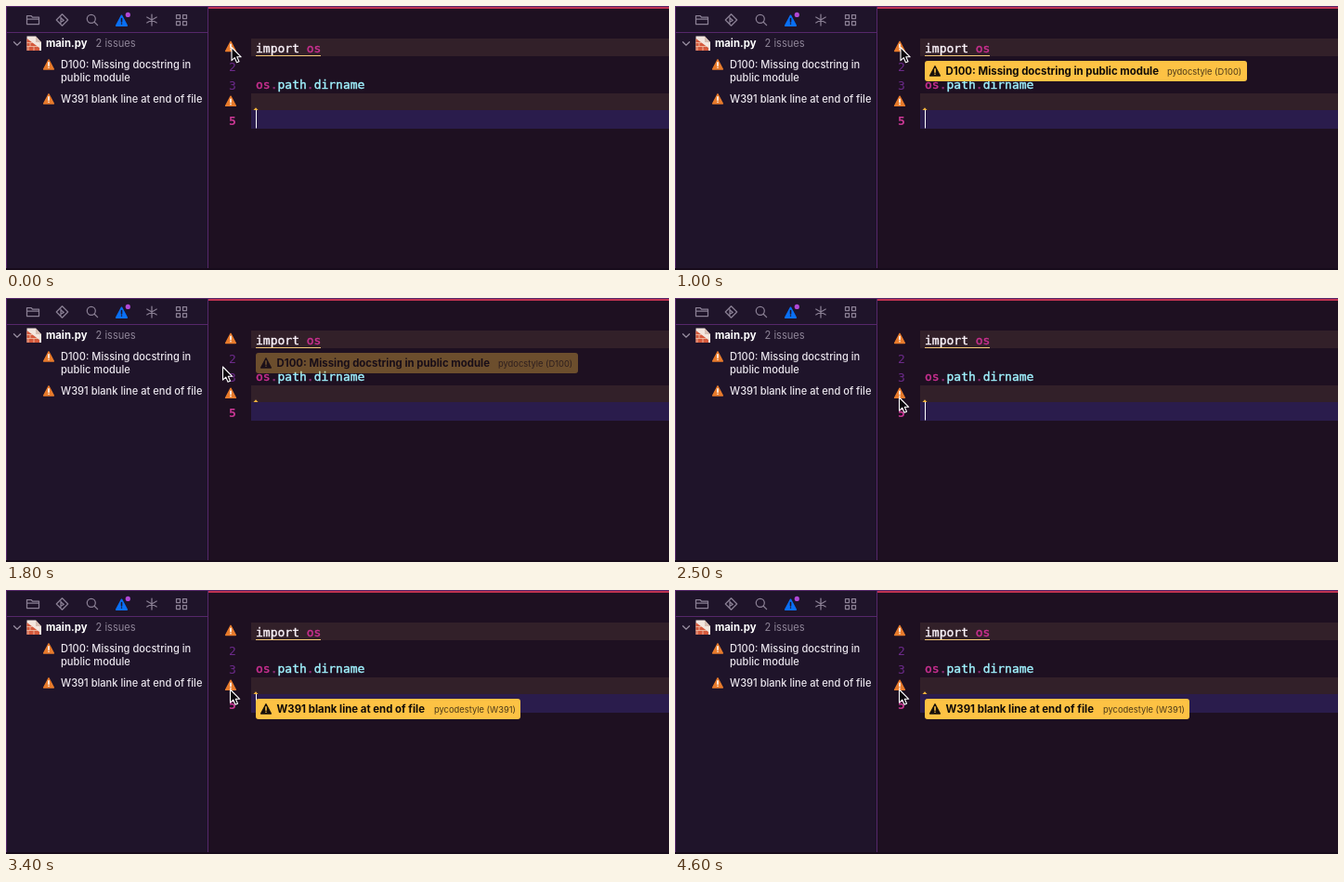
An HTML page that plays this animation: 714x284 px, repeating every 4700 ms.

```html
<!DOCTYPE html>
<html lang="en">
<head>
<meta charset="utf-8">
<title>Editor issues</title>
<style>
  html, body { margin: 0; width: 100%; height: 100%; overflow: hidden; background: #1e1021; }
  svg { display: block; width: 714px; height: 284px; }
  text { font-family: Inter, "Open Sans", sans-serif; font-size: 11.1px; white-space: pre; }
  .code text { font-family: "DejaVu Sans Mono", "Liberation Mono", monospace; font-size: 13px; }
  .code text, .code tspan { fill: var(--ink); stroke: var(--ink); stroke-width: .4; }
  .code .number { --ink: #6c2a8a; stroke: none; text-anchor: middle; }
  .plain { --ink: #fbf3fa; }
  .name { --ink: #a0f3ff; }
  .module { --ink: #cc3092; }
  .dot { --ink: #8d2d75; }
  .side text { fill: #ebe6ee; font-weight: 500; }
  .tools { fill: none; stroke: #8b8095; stroke-width: 1.25; stroke-linecap: round; stroke-linejoin: round; }
  .tip text { fill: #100b08; font-size: 11.42px; font-weight: 700; }
  .tip .tool { fill: #4b3819; font-size: 9.35px; font-weight: 400; }
</style>
</head>
<body>
<svg viewBox="0 0 714 284">
  <defs>
    <path id="triangle" d="M0-5.2L5.4 5H-5.4Z" stroke-width="1.4" stroke-linejoin="round"/>
    <path id="mark" d="M0-2.2V1.2M0 3.2V3.3" fill="none" stroke-width="1.6" stroke-linecap="round"/>
    <g id="warning">
      <use href="#triangle" fill="#e87b2c" stroke="#e87b2c"/>
      <use href="#mark" stroke="#fff"/>
    </g>
    <g id="alert">
      <use href="#triangle" fill="#17100b" stroke="#17100b"/>
      <use href="#mark" stroke="#fdc244"/>
    </g>
  </defs>

  <rect width="714" height="284" fill="#1e1021"/>
  <rect width="218" height="284" fill="#1f142a"/>
  <path d="M0 .5H714M.5 0V284M0 28.5H218M217.5 0V284" fill="none" stroke="#55276a"/>
  <rect x="218" y="1" width="496" height="2" fill="#bd3250"/>
  <rect y="282" width="714" height="2" fill="#170b1b"/>

  <g class="tools">
    <path d="M22.5 19.5V10.5H27L28.5 12H35.5V19.5ZM22.5 14H35.5"/>
    <path d="M60.5 8.8L66.7 15L60.5 21.2L54.3 15ZM59 12V18.2M59 12.8L62.3 15.4M59 17.3L62.3 15.4"/>
    <circle cx="91.8" cy="13.8" r="4.5"/>
    <path d="M95.2 17.2L98.6 20.6"/>
    <path d="M157 9V21M151.8 12L162.2 18M162.2 12L151.8 18"/>
    <path d="M183.5 9.5H187.5V13.5H183.5ZM190.5 9.5H194.5V13.5H190.5ZM183.5 16.5H187.5V20.5H183.5ZM190.5 16.5H194.5V20.5H190.5Z"/>
  </g>
  <g transform="translate(124.5 15.8)">
    <use href="#triangle" fill="#0a70f5" stroke="#0a70f5" transform="scale(1.08)"/>
    <use href="#mark" stroke="#1f142a"/>
  </g>
  <circle cx="131.3" cy="9.4" r="2.6" fill="#b148d6"/>

  <g class="side">
    <path d="M8.5 38.7L12 42.2L15.5 38.7" fill="none" stroke="#9a90a2" stroke-width="1.3" stroke-linecap="round"/>
    <path d="M22.5 32.5H32L38 39V48H22.5Z" fill="#f3e7df"/>
    <path d="M32 32.5V39H38Z" fill="#d9bfb3"/>
    <path d="M22.5 35L36 45V48H22.5Z" fill="#d4593c"/>
    <path d="M22.5 39.5H28.5M22.5 43.5H34M26 39.5V43.5M24 43.5V48M30 43.5V48" stroke="#f2c6ae" stroke-width=".8"/>
    <text x="43" y="44" style="font-size:11.3px;font-weight:700;fill:#fff">main.py</text>
    <text x="96.5" y="44" style="font-weight:400;fill:#8f8598">2 issues</text>
    <use href="#warning" x="46" y="63"/>
    <text x="59" y="67">D100: Missing docstring in</text>
    <text x="59" y="81">public module</text>
    <use href="#warning" x="46" y="100"/>
    <text x="59" y="104">W391 blank line at end of file</text>
  </g>

  <g class="code">
    <path d="M264 35H714V54H264ZM264 94H714V112H264Z" fill="#322029"/>
    <rect x="264" y="112" width="450" height="20" fill="#2a1c4c"/>
    <text class="number" x="244" y="70">2</text>
    <text class="number" x="244" y="90">3</text>
    <text class="number" x="244" y="128" style="--ink:#cb3795;font-weight:700">5</text>
    <text class="plain" x="269" y="50">import <tspan class="module">os</tspan></text>
    <text class="name" x="269" y="89"><tspan class="module">os</tspan><tspan class="dot">.</tspan>path<tspan class="dot">.</tspan>dirname</text>
    <path d="M269 53.5H339" stroke="#f3c878"/>
    <path d="M266.5 112L269 109.3L271.5 112Z" fill="#f3b53f"/>
    <use href="#warning" x="242" y="43.5"/>
    <use href="#warning" x="242" y="102.4"/>
  </g>
  <rect id="caret" x="269" y="112" width="1" height="19.5" fill="#fff"/>

  <g id="docTip" class="tip">
    <rect x="269" y="59" width="347" height="22" rx="3" fill="#fdc244"/>
    <use href="#alert" x="280" y="70"/>
    <text x="291.5" y="74">D100: Missing docstring in public module</text>
    <text class="tool" x="530" y="73.5">pydocstyle (D100)</text>
  </g>
  <g id="lineTip" class="tip">
    <rect x="269" y="117" width="285" height="22" rx="3" fill="#fdc244"/>
    <use href="#alert" x="280" y="128"/>
    <text x="291.5" y="132">W391 blank line at end of file</text>
    <text class="tool" x="461" y="131.5">pycodestyle (W391)</text>
  </g>

  <path id="pointer" d="M0 0V14.2L3.3 11.2L5.5 16.3L8 15.2L5.8 10.3H10.2Z" fill="#0b070d" stroke="#fff" stroke-width="1.1" stroke-linejoin="round"/>
</svg>
<script>
  const LOOP = 4700, STEP = 100;
  const [caret, docTip, lineTip, pointer] =
    ["caret", "docTip", "lineTip", "pointer"].map(id => document.getElementById(id));

  const ramp = (t, from, to) => Math.min(1, Math.max(0, (t - from) / (to - from)));
  const ease = p => p * p * (3 - 2 * p);
  const mix = (a, b, p) => a + (b - a) * p;

  function pointerAt(t) {
    const leave = ease(ramp(t, 1500, 1800));
    const arrive = ease(ramp(t, 1800, 2300));
    return [mix(mix(243, 233.5, leave), 241.5, arrive), mix(mix(44.5, 74, leave), 107, arrive)];
  }

  function draw(t) {
    caret.setAttribute("opacity", t % 1000 < 550 ? 1 : 0);
    docTip.setAttribute("opacity", ramp(t, 300, 500) * (1 - ramp(t, 1670, 1870)));
    lineTip.setAttribute("opacity", ramp(t, 2700, 2900));
    pointer.setAttribute("transform", `translate(${pointerAt(t)})`);
  }

  const start = performance.now();
  function tick() {
    const t = (performance.now() - start) % LOOP;
    draw(Math.floor(t / STEP) * STEP);
    requestAnimationFrame(tick);
  }
  tick();
</script>
</body>
</html>
```
